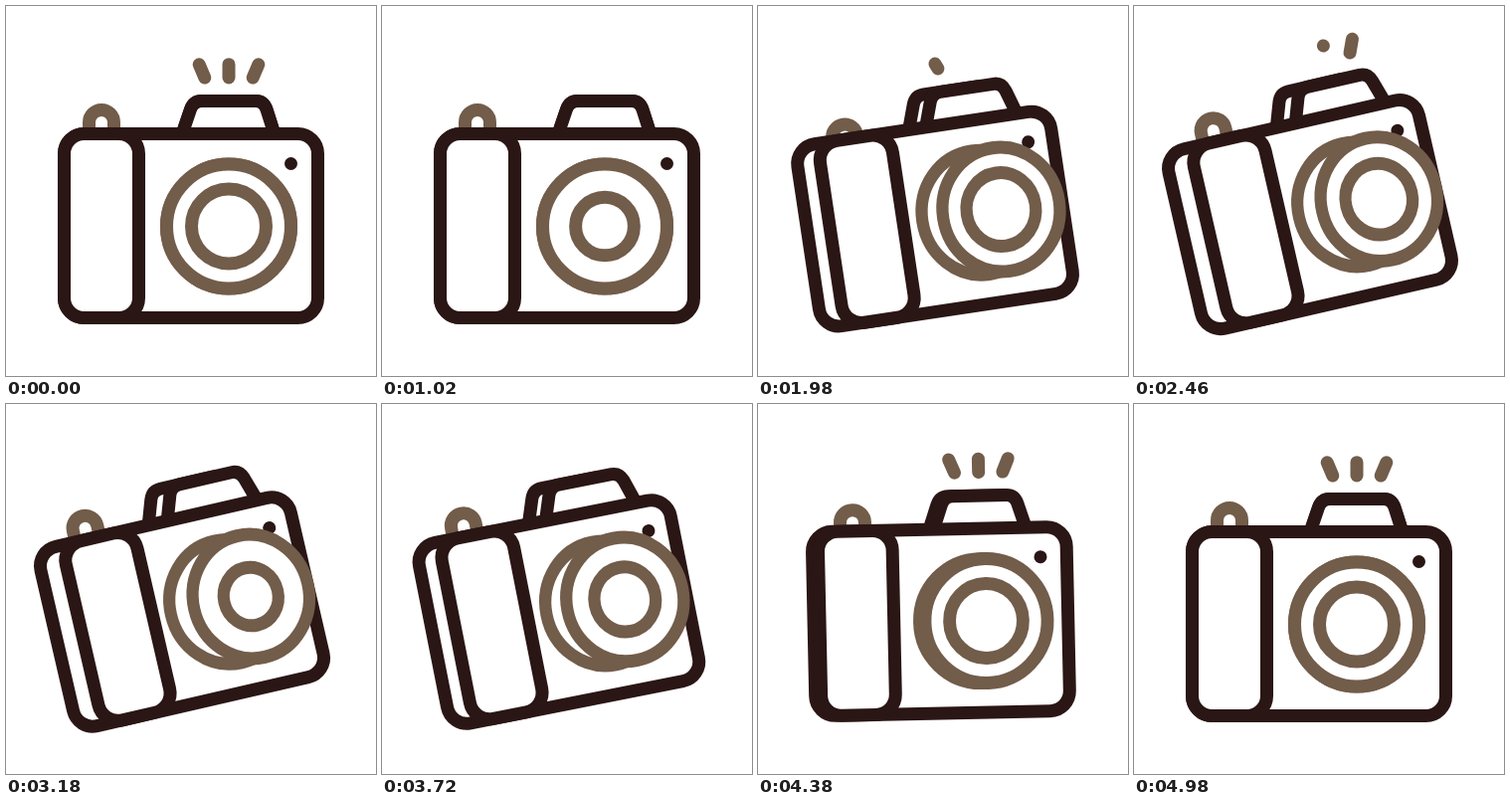
Animation of 372x372 px, one loop 5400 ms. Source, as an HTML page with a canvas:

```html
<!DOCTYPE html>
<html lang="en">
<head>
<meta charset="utf-8">
<title>Camera</title>
<style>
  html, body { margin: 0; width: 100%; height: 100%; overflow: hidden; background: #fff; }
  canvas { display: block; }
</style>
</head>
<body>
<canvas id="stage" width="372" height="372"></canvas>
<script>
const ctx = document.getElementById('stage').getContext('2d');
const DARK = '#2a1614', BROWN = '#725c4a', WHITE = '#fff';
const LOOP = 5400;

// Smooth progress from 0 to 1 between two times
function ramp(t, start, end) {
  const x = Math.min(1, Math.max(0, (t - start) / (end - start)));
  return x * x * (3 - 2 * x);
}

const hump = (t, start, end) =>
  t > start && t < end ? Math.sin(Math.PI * (t - start) / (end - start)) : 0;

function outline(color, fill) {
  if (fill) {
    ctx.fillStyle = WHITE;
    ctx.fill();
  }
  ctx.strokeStyle = color;
  ctx.stroke();
}

// Draw with the origin at the camera centre, moved sideways by its depth
function layer(shift, paint) {
  ctx.save();
  ctx.translate(shift, 0);
  paint();
  ctx.restore();
}

function box(x, y, w, h) {
  ctx.beginPath();
  ctx.roundRect(x, y, w, h, 20);
  outline(DARK, true);
}

function ring(radius, squeeze) {
  ctx.save();
  ctx.translate(38, 0.5);
  ctx.scale(squeeze, 1);
  ctx.beginPath();
  ctx.arc(0, 0, radius, 0, 2 * Math.PI);
  outline(BROWN, true);
  ctx.restore();
}

function viewfinder() {
  ctx.beginPath();
  ctx.moveTo(-8, -95);
  ctx.lineTo(-0.5, -117);
  ctx.quadraticCurveTo(2.5, -125.5, 11, -125.5);
  ctx.lineTo(65, -125.5);
  ctx.quadraticCurveTo(73, -125.5, 76, -117);
  ctx.lineTo(83, -95);
  outline(DARK, true);
}

function strap(drop) {
  ctx.beginPath();
  ctx.moveTo(-102.5, -90 + drop);
  ctx.lineTo(-102.5, -104 + drop);
  ctx.arc(-90, -104 + drop, 12.5, Math.PI, 2 * Math.PI);
  ctx.lineTo(-77.5, -90 + drop);
  outline(BROWN);
}

// One flash ray: its outer end grows out, later its inner end follows
function ray(t, index) {
  const late = index * 165;
  let head = 1, tail = 0;
  if (t < 1500) {
    tail = ramp(t, 390 + late, 610 + late);
  } else if (t < 3300) {
    head = ramp(t, 1900 + late, 2090 + late);
    tail = ramp(t, 2110 + late, 2310 + late);
  } else {
    head = ramp(t, 3790 + late, 3980 + late);
  }
  if (head <= 0 || tail >= 1) return;
  const side = index - 1;
  const point = k => [38 + side * (24.2 + 5.6 * k), -149 - 13.3 * k];
  ctx.beginPath();
  ctx.moveTo(...point(tail));
  ctx.lineTo(...point(head + 0.001));
  outline(BROWN);
}

function draw(t) {
  const depth = ramp(t, 1150, 2210) - ramp(t, 3450, 4800);
  const turn = ramp(t, 1150, 2520) - ramp(t, 3450, 4600);
  const lift = ramp(t, 1150, 2650) - ramp(t, 3740, 4650);
  const drop = 9 * hump(t, 1500, 2460) + 4 * hump(t, 3700, 4600);
  const pulse = t < 4320 ? (1 - Math.cos(2 * Math.PI * t / 2160)) / 2 : 0;
  const squeeze = 1 - 0.065 * depth;
  const stretch = 1.5 * depth;

  ctx.fillStyle = WHITE;
  ctx.fillRect(0, 0, 372, 372);
  ctx.save();
  ctx.translate(186 - 9 * depth, 221 - 12 * lift);
  ctx.rotate(-13 * turn * Math.PI / 180);
  ctx.lineWidth = 13;

  ctx.lineCap = 'round';
  layer(13 * depth, () => [0, 1, 2].forEach(i => ray(t, i)));
  ctx.lineCap = 'butt';
  layer(-4.5 * depth, viewfinder);
  layer(15 * depth, viewfinder);
  layer(14 * depth, () => strap(drop));

  box(-127.5 - stretch, -92.5, 255 + 2 * stretch, 185);
  layer(24.5 * depth, () => box(-127.5, -92.5, 75 - stretch, 185));
  layer(4 * depth, () => {
    ctx.beginPath();
    ctx.arc(100.5, -62.5, 6.5, 0, 2 * Math.PI);
    ctx.fillStyle = DARK;
    ctx.fill();
  });
  layer(9 * depth, () => ring(62.5, squeeze));
  layer(33 * depth, () => {
    ring(62.5, squeeze);
    ring(37.5 - 8.2 * pulse, squeeze);
  });
  ctx.restore();
}

function tick() {
  draw(performance.now() % LOOP);
  requestAnimationFrame(tick);
}
tick();
</script>
</body>
</html>
```
